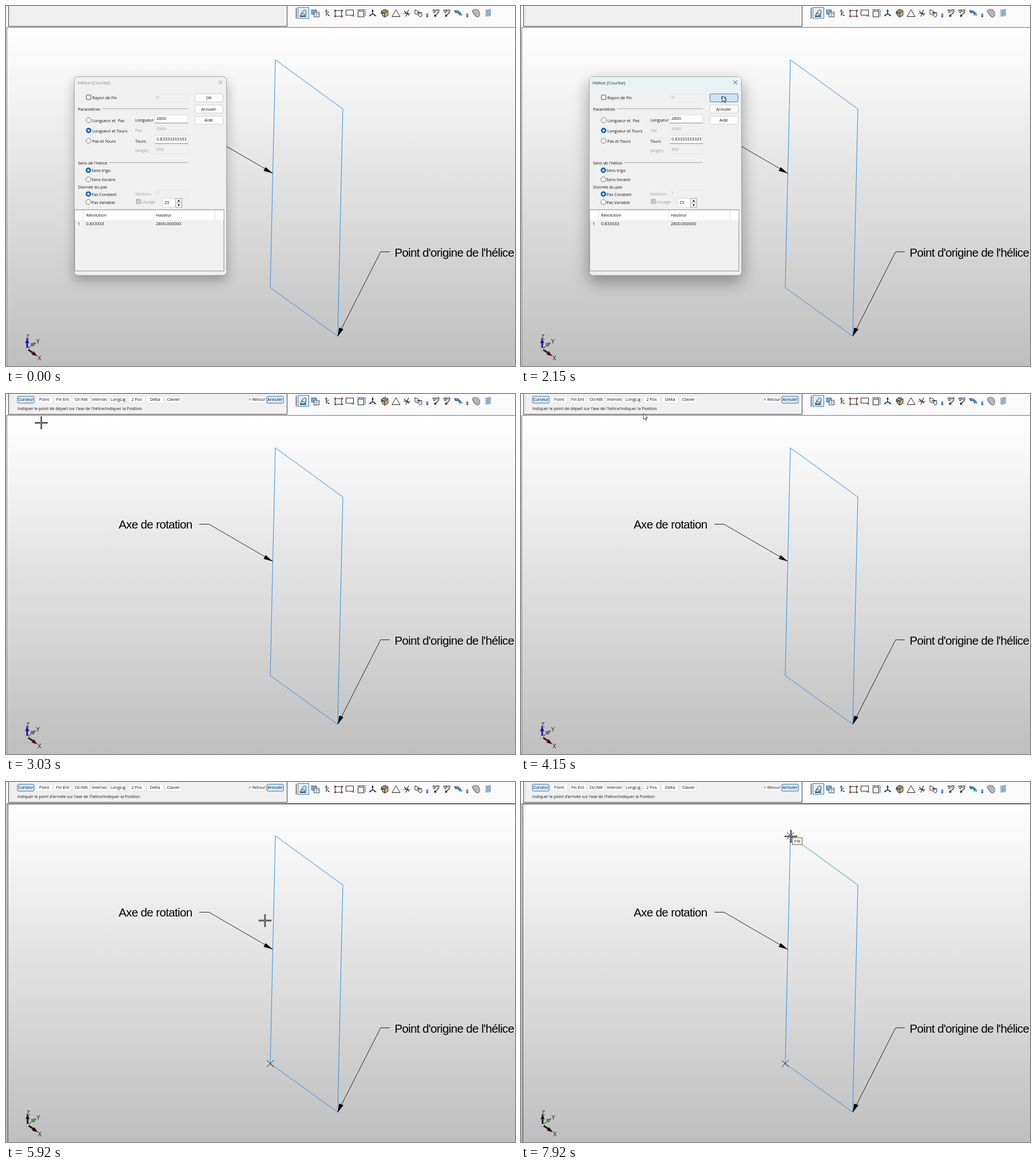
These frames come from a looping animation (890x629 px, 7.99 s). An HTML page:

```html
<!DOCTYPE html>
<html lang="fr">
<head>
<meta charset="utf-8">
<title>Hélice</title>
<style>
  html, body { margin: 0; width: 100%; height: 100%; overflow: hidden; background: #fff; }
  svg { display: block; width: 890px; height: 629px; font: 7.2px "Open Sans", "Noto Sans", sans-serif; }
  text { fill: #111; white-space: pre; }
  .mid { text-anchor: middle; }
  .off { fill: #a0a0a0; }
  .num { font-size: 7.4px; }
  .label { font: 20.5px "Liberation Sans", Arial, sans-serif; letter-spacing: -.62px; fill: #000; }
  .axis { font: 10px "Liberation Sans", Arial, sans-serif; fill: #222; }
  .edge { stroke: #2f8fe6; stroke-width: 1; }
  .edge.hot { stroke: #12b07c; }
  .thin { fill: none; stroke: #111; stroke-width: .9; }
  .icon { fill: none; stroke: #222; stroke-width: 1; }
  #dialog { transform-origin: 252px 297px; }
  #frame { filter: drop-shadow(0 9px 10px rgba(0,0,0,.28)); }
  #frame.active { filter: drop-shadow(0 11px 14px rgba(0,0,0,.36)); }
</style>
</head>
<body>
<svg viewBox="0 0 890 629">
  <defs>
    <linearGradient id="sky" x2="0" y2="1">
      <stop offset="0" stop-color="#fff"/><stop offset=".04" stop-color="#fdfdfd"/><stop offset="1" stop-color="#bfbfbf"/>
    </linearGradient>
    <path id="mark" class="thin" d="M-6-6L6 6M-6 6L6-6"/>
  </defs>

  <rect width="890" height="38" fill="#fafafa"/>
  <rect y="36" width="890" height="593" fill="#f0f0f0"/>
  <rect x="2" y="38" width="888" height="591" fill="url(#sky)"/>
  <path d="M1.5 629V37.5H890" fill="none" stroke="#777"/>
  <path id="focus" d="M3.5 629V38.5H890" fill="none" stroke="#555"/>
  <path d="M4.5-1V35.5H491.5V-1" fill="#f0f0f0" stroke="#444"/>
  <path d="M7.5 4V31" stroke="#aaa" stroke-dasharray="1 2"/>
  <g id="icons"></g>
  <g id="prompt"></g>

  <g id="edges"></g>
  <path class="thin" d="M338 227.5H355L466 292M671 429.5H655L580 577"/>
  <path d="M466.500 292.500L450.500 288L454 281.500ZM580 577.500L582.500 562L590 564.500Z"/>
  <text class="label" x="197" y="234.500">Axe de rotation</text>
  <text class="label" x="679.500" y="437.500">Point d'origine de l'hélice</text>

  <g id="triad"></g>
  <use id="markLow" href="#mark" x="462" y="492"/>
  <use id="markHigh" href="#mark" x="471" y="94"/>

  <g id="dialog"></g>

  <g id="cursor">
    <circle id="click" r="9" fill="#f2e205" fill-opacity=".75"/>
    <g id="cross">
      <path d="M-11 0H11M0-11V11" stroke="#222" stroke-width="2.600"/>
      <path d="M-10 0H10M0-10V10" stroke="#bbb" stroke-width=".8"/>
    </g>
    <path id="arrow" d="M0 0V10.500L2.500 8.300L4.200 12L5.800 11.300L4.200 7.700H7.500Z" fill="#fff" stroke="#111" stroke-width=".8"/>
    <g id="snap">
      <rect x="2.500" y="2.500" width="17" height="12" fill="#ffffe6" stroke="#666"/>
      <text class="mid" x="11" y="11.300">FIN</text>
    </g>
  </g>
</svg>

<script>
const LOOP = 7990;
const $ = id => document.getElementById(id);
const text = (x, y, s, cls = "") => `<text x="${x}" y="${y}" class="${cls}">${s}</text>`;
const box = (x, y, w, h, fill, stroke, rx = 0) =>
  `<rect x="${x + .5}" y="${y + .5}" width="${w}" height="${h}" rx="${rx}" fill="${fill}" stroke="${stroke}"/>`;
const line = (d, stroke, width = 1) => `<path d="${d}" fill="none" stroke="${stroke}" stroke-width="${width}"/>`;
const at = (x, content) => `<g transform="translate(${x} 12.500)">${content}</g>`;

// Toolbar icons, each drawn around its own centre
const down = line("M0-3V3M-2 1L0 4L2 1M-2-1H2", "#1f5fae", 1.2);
const note = s => `<text class="mid" y="-3" style="font-size:4.500px;font-weight:700">${s}</text>`
  + line("M-5-1H-1M5-2L-3 6M-3 6L-2 2M-3 6L1 5", "#222", 1.1);
const ink = d => `<path class="icon" d="${d}"/>`;
$("icons").innerHTML = line("M507.500 3V22", "#555", 1.5) + box(510, 2, 19, 19, "#dcecfa", "#2b86d1") + [
  [520, ink("M-5 5L-2-2L2-6L5-3L3 4ZM-2 0L2 2M-6 6H5") + line("M-6 3L-3 6M1 6L5 3", "#2b6cb0")],
  [541, box(-7, -6, 8, 7, "#8bb7e4", "#234f86") + box(-3, -2, 9, 8, "#eee", "#234f86") + line("M-1 2H5M2-1V6", "#c08a30")],
  [561, ink("M-1 5V-5M-3-3L-1-6L1-3M-1 0L4-2M-1 1L4 4M2 4H5")],
  [581, box(-6, -5, 11, 10, "none", "#222") + `<path d="M-7-6h3v3h-3zM5-6h3v3h-3zM-7 4h3v3h-3zM5 4h3v3h-3z" fill="#9b3c22"/>`],
  [601, box(-7, -6, 13, 9, "#fff", "#222") + line("M3 5H8M6 3L8 6", "#2776bf")],
  [621, box(-6, -4, 10, 10, "#f4f4f4", "#222") + line("M-7-6H7M7-6V6M-3-7V-4M3-7V-4", "#2d608f")],
  [641, line("M0 1V-6M0 1L-5 4M0 1L5 4", "#183b72", 1.5) + `<path d="M-7 5l4-3v3zM7 5l-4-3v3zM0-7l2 4h-4z" fill="#222"/>`],
  [662, `<path d="M-6-3L1-7L6-4V4L0 7L-4 4Z" fill="#c4ad82" stroke="#333"/>` + ink("M-6-3L0 0L6-4M0 0V7M-7 0H-1M-3-6L3-2")],
  [682, ink("M0-6L7 6H-7Z")],
  [701, line("M-6 0L6 1M3-6L-2 6M-5-4L4 4", "#333", 1.2) + line("M-3 0H2", "#923", 1.5)],
  [721, ink("M-6-6L1-3V4L-6 1ZM-2-1H6V5L1 7") + line("M-3 0H4", "#2871b5")],
  [736.5, `<g transform="translate(0 3)">${down}</g>`],
  [752, note("NOTE")],
  [771, note("ABCD")],
  [791, line("M-7-4Q1-6 6 4M-6-1Q0-3 3 4", "#2871b5", 2) + line("M-7-4L-3-1", "#222")],
  [806.5, `<g transform="translate(0 3)">${down}</g>`],
  [822, `<path d="M-7-4Q-2-9 4-5Q9 2 4 7Q-1 7-4 2Z" fill="#aaa" stroke="#666"/>` + line("M-4-5L4 6M0-6L6 3", "#e4e4e4")],
  [843, [-6, -3, 0, 3].map(y => line(`M-5 ${y}Q0 ${y + 4} 5 ${y}Q0 ${y - 2}-4 ${y + 3}`, "#47799f")).join("")]
].map(([x, art]) => at(x, art)).join("");

// Command bar
const pill = (x, s, lit) => box(x - 15, 3.5, 29, 12, lit ? "#dcecf9" : "#fdfdfd", lit ? "#2478bd" : "#e2e2e2", 2)
  + text(x, 12.2, s, "mid");
$("prompt").innerHTML =
  ["Curseur", "Point", "Fin Ent", "Ctr/Mil", "Intersec", "LongLig", "2 Pos", "Delta", "Clavier"]
    .map((s, i) => pill(34.5 + 32.3 * i, s, i === 0)).join("")
  + pill(439, "&lt; Retour") + pill(470.5, "Annuler", true)
  + `<text id="ask" x="20" y="28.300" style="font-size:7.050px"></text>`;

// Parallelogram
const corners = [[471, 94], [589, 180], [580, 577], [462, 492]];
$("edges").innerHTML = corners.map(([x, y], i) => {
  const [u, v] = corners[(i + 1) % 4];
  return `<line class="edge" x1="${x}" y1="${y}" x2="${u}" y2="${v}"/>`;
}).join("");
const [topEdge, , lowEdge, leftEdge] = $("edges").children;

// Axis triad in its two colourings
const triad = (id, z, y, x) => `<g id="${id}">`
  + line("M37 599V587", z, 3) + `<path d="M37 580L40.500 589H33.500Z" fill="${z}"/>`
  + line("M39 598L46 592", y, 2) + `<path d="M52 588L47.500 595L43 590Z" fill="${y}" stroke="#333" stroke-width=".6"/>`
  + line("M38 600L47 606", x, 3) + `<path d="M55 612L44.500 609L48.500 603Z" fill="${x}"/>`
  + `<circle cx="37" cy="599.500" r="2.300" fill="#eee" stroke="#555" stroke-width=".6"/>`
  + text(35, 581.5, "Z", "axis") + text(52.5, 590, "Y", "axis") + text(55, 619, "X", "axis") + "</g>";
$("triad").innerHTML = triad("triadA", "#1c1ca8", "#77756a", "#4d1010")
  + `<g transform="translate(.8 0)">${triad("triadB", "#141438", "#45a83c", "#1d0c0c")}</g>`;

// Dialog
const radio = (x, y, s, on) => (on
  ? `<circle cx="${x}" cy="${y}" r="4.700" fill="#0b62bd"/><circle cx="${x}" cy="${y}" r="1.900" fill="#fff"/>`
  : `<circle cx="${x}" cy="${y}" r="4.300" fill="#fafafa" stroke="#666" stroke-width=".9"/>`) + text(151 - (y > 280) * 1.5, y + 3, s);
const field = (y, s, on) => box(260, y, 57, 14, on ? "#fff" : "#f0f0f0", on ? "#e0e0e0" : "#e9e9e9")
  + (on ? line(`M260 ${y + 14.5}H318`, "#888") : "") + text(263, y + 9, s, on ? "num" : "num off");
const button = (y, s, extra = "") => box(330, y, 49, 14, "#fdfdfd", "#d0d0d0", 2) + extra + text(354.5, y + 10, s, "mid");
const tick = (x, y, off) => box(x, y, 8, 8, off ? "#bdbdbd" : "#fafafa", off ? "#bdbdbd" : "#555", 1.5);

$("dialog").innerHTML =
  `<rect id="frame" x="119.500" y="123.500" width="266" height="347" rx="6" fill="#f0f0f0" stroke="#a9a9a9"/>`
  + `<path id="tint" d="M120 146V129Q120 124 125 124H380Q385 124 385 129V146Z" fill="#e6f4f5"/>`
  + `<text id="caption" x="125" y="136.500" style="font-size:8px">Hélice (Courbe)</text>`
  + `<path id="close" d="M371.500 130L378.500 137M378.500 130L371.500 137" stroke-width=".9"/>`
  + tick(140, 155) + text(151, 163, "Rayon de Fin") + field(153, "0")
  + button(153, "", `<g id="hover">${box(330, 153, 49, 14, "#e0eef9", "#2a7fc4", 2)}</g><g id="press">${box(330, 153, 49, 14, "#cfe4f5", "#4a87b8", 2)}</g>`)
  + text(354.5, 163, "OK", "mid") + button(172.5, "Annuler") + button(192, "Aide")
  + text(126, 182.5, "Paramètres") + line("M168 179.500H318", "#aaa")
  + radio(144.5, 199.5, "Longueur et\u00a0 Pas") + radio(144.5, 217.5, "Longueur et Tours", true) + radio(144.5, 235.5, "Pas et Tours")
  + text(226, 202, "Longueur") + field(190, "2800", true)
  + text(226, 220, "Pas", "off") + field(208, "3360")
  + text(226, 238.5, "Tours") + field(226, "0.83333333333", true)
  + text(226, 254.5, "(Angle)", "off") + field(244, "300")
  + text(126, 276.5, "Sens de l'hélice") + line("M180 273.500H318", "#aaa")
  + radio(144, 287, "Sens trigo", true) + radio(144, 303, "Sens horaire")
  + text(126, 319, "Donnée du pas")
  + radio(144, 328.5, "Pas Constant", true) + radio(144, 342.5, "Pas Variable")
  + text(226, 330.5, "Sections", "off") + field(320, "1")
  + tick(227, 337, true) + line("M229 341L231 343.500L234.500 339.500", "#fff") + text(237, 344.5, "Lissage", "off")
  + box(273, 336, 23, 15, "#fff", "#ddd") + text(277, 346, "25", "num")
  + box(296, 336, 11, 7, "#f6f6f6", "#aaa") + box(296, 343, 11, 8, "#f6f6f6", "#aaa")
  + `<path d="M302 338.500l2 3h-4zM302 349.500l2-3h-4z"/>`
  + box(119.5, 355.5, 261, 107, "#f0f0f0", "#8a8a8a") + `<rect x="120.500" y="357" width="260" height="17" fill="#fff"/>`
  + line("M135.500 357V374M258.500 357V374M365.500 357V374", "#ddd")
  + text(140, 367.8, "Révolution") + text(262, 367.8, "Hauteur")
  + text(125, 382.5, "1", "num") + text(140, 382.5, "0.833333", "num") + text(262, 382.5, "2800.000000", "num");

// Time tables: [ms, ...values]
const path = [
  [260, 783, 569], [1010, 352, 157], [2349, 352, 157], [2350, 347, 157], [2480, 347, 157],
  [3100, 26, 37], [3240, 18, 31], [3940, 103, 36], [4080, 160, 34], [4150, 214, 34], [4210, 214, 34],
  [4760, 456, 485], [4840, 455, 491], [5440, 455, 491], [6130, 452, 134], [6190, 450, 132],
  [6560, 63, 31], [6680, 70, 32], [6740, 70, 32], [6950, 88, 33], [7100, 92, 33],
  [7780, 502, 140], [7850, 472, 95], [LOOP, 472, 95]
];
const fade = [[2350, 1, 1], [2420, .68, .985], [2485, .62, .983], [2490, .32, .965], [2560, .08, .945], [2620, 0, .93]];

function sample(table, t) {
  const i = table.findIndex(row => row[0] > t);
  if (i === 0) return table[0].slice(1);
  if (i < 0) return table[table.length - 1].slice(1);
  const [a, b] = [table[i - 1], table[i]];
  const k = (t - a[0]) / (b[0] - a[0]);
  return a.slice(1).map((v, n) => v + (b[n + 1] - v) * k);
}

const show = (id, on) => { $(id).style.display = on ? "" : "none"; };

function draw(t) {
  const within = (a, b = LOOP) => t >= a && t < b;
  const [x, y] = sample(path, t);
  const cross = within(2350) && y > 37;
  show("cursor", within(260));
  $("cursor").setAttribute("transform", `translate(${x} ${y})`);
  show("cross", cross);
  show("arrow", !cross);
  show("click", within(5370, 5580));
  show("snap", within(4840, 5440) || within(7920));

  const [opacity, scale] = sample(fade, t);
  const active = within(2080);
  show("dialog", opacity > 0);
  $("dialog").style.opacity = opacity;
  $("dialog").style.transform = `scale(${scale})`;
  $("frame").classList.toggle("active", active);
  show("tint", active);
  $("caption").style.fill = active ? "#222" : "#8a8a8a";
  $("close").style.stroke = active ? "#333" : "#888";
  $("hover").style.opacity = Math.min(1, Math.max(0, (t - 1010) / 210));
  show("press", active);

  const second = within(5510);
  show("prompt", within(2350));
  $("ask").textContent = `Indiquer le point ${second ? "d'arrivée" : "de départ"} sur l'axe de l'hélice/Indiquer la Position`;
  show("focus", second);
  show("triadA", !second);
  show("triadB", second);

  leftEdge.classList.toggle("hot", within(4840, 5100));
  lowEdge.classList.toggle("hot", within(5100, 5510));
  topEdge.classList.toggle("hot", within(7920));
  show("markLow", within(4840));
  show("markHigh", within(7920));
}

const start = performance.now();
function tickFrame() {
  draw((performance.now() - start) % LOOP);
  requestAnimationFrame(tickFrame);
}
tickFrame();
</script>
</body>
</html>
```
